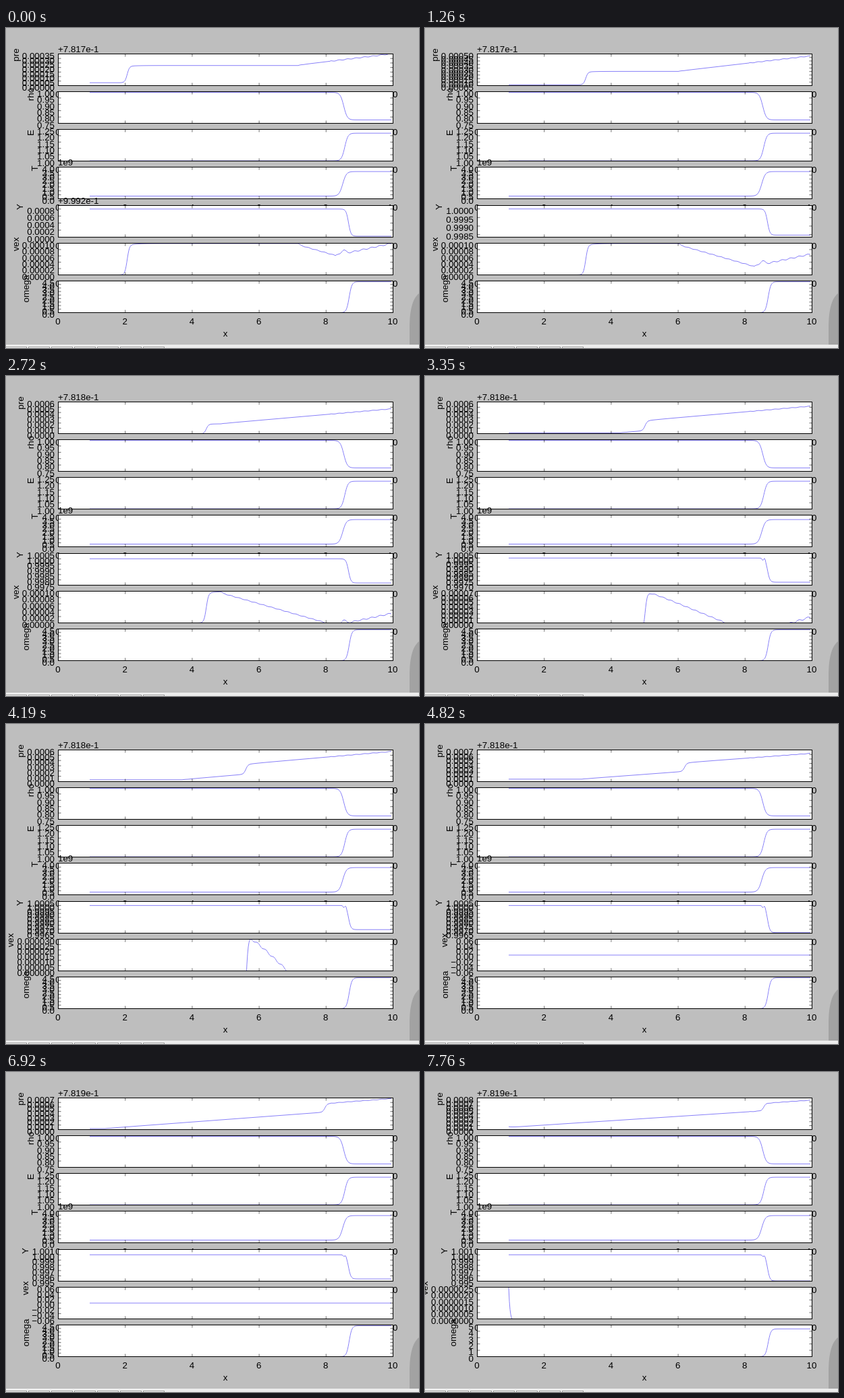
Write an HTML page with a canvas that moves like this. It is 612 by 475 pixels and loops after 8000 ms.

```html
<!DOCTYPE html>
<html>
<head>
<meta charset="utf-8">
<style>
html, body { margin: 0; width: 612px; height: 475px; overflow: hidden; background: #bebebe; }
canvas { display: block; }
</style>
</head>
<body>
<canvas id="stage" width="612" height="475"></canvas>
<script>
const ctx = document.getElementById('stage').getContext('2d');
const LOOP = 8000;
const STARTS = [0, 630, 1260, 1880, 2720, 3350, 4190, 4820, 5660, 6290, 6920, 7760];
const LEFT = 77.5, RIGHT = 573.5, HEIGHT = 47, UNIT = 49.6;
const FIRST = 124, LAST = 571;
const TOPS = [38.5, 94.5, 150.5, 206.5, 263.5, 319.5, 375.5];

const sig = (x, c, w) => 1 / (1 + Math.exp((c - x) / w));
const bell = (x, c, w) => Math.exp(-(((x - c) / w) ** 2));
const frontX = k => 179.5 + 29.3 * k;   // wave moving right
const backX = k => 433 - 28.6 * k;      // wave moving left

// Rise across the right-moving front, with a slow tail behind it
function front(x, k) {
  const c = frontX(k);
  return 0.95 * sig(x, c, 1.7) + (x > c ? 0.05 * (1 - Math.exp((c - x) / 12)) : 0);
}

function pressure(x, k) {
  const u = x - backX(k);
  const base = 3.2 + 1.4 * k + 0.05 * k * k;
  const ramp = Math.max(0, u - 8) * (k ? 0.111 : 0.09);
  const step = u > 0 ? 1.2 * (1 - Math.exp(-u / 4)) : 0;
  const ripple = x > 480 && u > 0 ? 0.4 * Math.sin(x * 0.5) : 0;
  const edge = k === 11 ? 2 * Math.exp((FIRST - x) / 5) : 0;
  return (base + 19 * front(x, k) + ramp + step + ripple + edge) * 1e-5;
}

function velocity(x, k) {
  if (k === 11) return 2.7e-6 * Math.exp((FIRST - x) / 1.9) - 0.2e-6;
  if (k > 6) return 0;
  const u = Math.min(x, 488) - backX(k);
  let v = 9.9 * front(x, k);
  if (u > 0) {
    const stairs = u - 1.5 * Math.sin(u * 0.52);
    v -= 0.061 * stairs + 0.4 * (1 - Math.exp(-u / 3));
  }
  if (x > 488) {
    v += 0.046 * (x - 488) + 1.2 * bell(x, 500, 4.5) + 0.18 * Math.sin((x - 488) * 0.5);
  }
  return Math.min(v, 9.9) * 1e-5;
}

function fraction(x, k) {
  const burnt = 0.00077 + 0.00038 * k;
  const kink = k > 4 ? 2e-4 * (bell(x, 503.5, 1.3) - bell(x, 500.5, 1.5)) : 0;
  return 1 - burnt * sig(x, 507.5, 1.8) + kink;
}

function pressureAxis(k) {
  const hi = [35, 45, 50, 60, 60, 60, 60, 70, 70, 80, 70, 80][k] * 1e-5;
  const shift = k < 4 ? 0 : k < 10 ? 1 : 2;
  return { lo: k === 2 ? 5e-5 : 0, hi, step: k < 3 ? 5e-5 : 1e-4, dp: k < 3 ? 5 : 4,
    minus: shift * 1e-4, note: '+7.8' + (17 + shift) + 'e-1' };
}

function fractionAxis(k) {
  if (k === 0) return { lo: 0, hi: 9e-4, step: 2e-4, dp: 4, minus: 0.9992, note: '+9.992e-1' };
  const lo = [0, 0.9988, 0.99835, 0.998, 0.9975, 0.997, 0.9965, 0.9965, 0.996][k] || 0.995;
  const hi = k < 3 ? 1.0002 : k < 9 ? 1.0005 : 1.001;
  return { lo, hi, step: k < 2 ? 2e-4 : k < 9 ? 5e-4 : 1e-3, dp: k < 9 ? 4 : 3 };
}

function velocityAxis(k) {
  if (k < 5) return { lo: 0, hi: 1e-4, step: 2e-5, dp: 5 };
  if (k === 5) return { lo: 0, hi: 7e-5, step: 1e-5, dp: 5 };
  if (k === 6) return { lo: 0, hi: 3e-5, step: 5e-6, dp: 6 };
  if (k < 11) return { lo: -0.06, hi: 0.06, step: 0.02, dp: 2 };
  return { lo: 0, hi: 2.5e-6, step: 5e-7, dp: 7 };
}

// dy: name centre below the panel top; gap: name centre left of the tick labels
const PANELS = [
  { name: 'pre', dy: 1.5, gap: 9, axis: pressureAxis, curve: pressure },
  { name: 'rho', dy: 4, gap: 9, axis: () => ({ lo: 0.75, hi: 1, step: 0.05, dp: 2 }),
    curve: x => 0.994 - 0.217 * sig(x, 500.5, 2.6) },
  { name: 'E', dy: 5, gap: 9, axis: () => ({ lo: 1, hi: 1.25, step: 0.05, dp: 2 }),
    curve: x => 1.002 + 0.218 * sig(x, 502, 2.4) },
  { name: 'T', dy: 2, gap: 10, axis: () => ({ lo: 0, hi: 4, step: 0.5, dp: 1, note: '1e9' }),
    curve: x => 0.34 + 3.1 * sig(x, 499, 2.7) },
  { name: 'Y', dy: 2, gap: 10, axis: fractionAxis, curve: fraction },
  { name: 'vex', dy: 1.5, gap: 9, axis: velocityAxis, curve: velocity },
  { name: 'omega', dy: 11.5, gap: 23,
    axis: k => k < 11 ? { lo: 0, hi: 4.5, step: 0.5, dp: 1 } : { lo: 0, hi: 5, step: 1, dp: 0 },
    curve: x => 4.38 * sig(x, 508.5, 2) }
];

function text(str, x, y, align) {
  ctx.textAlign = align;
  ctx.fillText(str, x, y);
}

function line(x1, y1, x2, y2) {
  ctx.beginPath();
  ctx.moveTo(x1, y1);
  ctx.lineTo(x2, y2);
  ctx.stroke();
}

function drawPanel(panel, top, k) {
  const axis = panel.axis(k), bottom = top + HEIGHT;
  const toY = v => bottom - (v - axis.lo) / (axis.hi - axis.lo) * HEIGHT;

  ctx.fillStyle = '#fff';
  ctx.fillRect(LEFT, top, RIGHT - LEFT, HEIGHT);

  ctx.save();
  ctx.beginPath();
  ctx.rect(LEFT, top, RIGHT - LEFT, HEIGHT);
  ctx.clip();
  ctx.beginPath();
  for (let x = FIRST; x <= LAST; x++) ctx.lineTo(x, toY(panel.curve(x, k) - (axis.minus || 0)));
  ctx.strokeStyle = '#8880f8';
  ctx.lineWidth = 1;
  ctx.stroke();
  ctx.restore();

  ctx.strokeStyle = ctx.fillStyle = '#000';
  ctx.lineWidth = 1;
  ctx.strokeRect(LEFT, top, RIGHT - LEFT, HEIGHT);
  ctx.lineWidth = 0.6;

  for (let n = 0; n <= 10; n += 2) {
    const x = LEFT + n * UNIT;
    line(x, top, x, top + 4);
    line(x, bottom, x, bottom - 4);
    text(n, x - 0.5, bottom + 17.3, 'center');
  }

  let widest = 0;
  const end = Math.floor(axis.hi / axis.step + 1e-6);
  for (let i = Math.ceil(axis.lo / axis.step - 1e-6); i <= end; i++) {
    const y = toY(i * axis.step);
    const label = (i * axis.step).toFixed(axis.dp).replace('-', '\u2212');
    line(LEFT, y, LEFT + 4, y);
    line(RIGHT, y, RIGHT - 4, y);
    text(label, 72, y + 7.3, 'right');
    widest = Math.max(widest, ctx.measureText(label).width);
  }
  if (axis.note) text(axis.note, LEFT - 0.5, top - 2.5, 'left');

  ctx.save();
  ctx.translate(72 - widest - panel.gap, top + panel.dy);
  ctx.rotate(-Math.PI / 2);
  text(panel.name, 0, 4, 'center');
  ctx.restore();
}

function drawDesktop() {
  ctx.fillStyle = '#bebebe';
  ctx.fillRect(0, 0, 612, 475);

  ctx.beginPath();
  ctx.moveTo(612, 394);
  ctx.bezierCurveTo(602, 402, 598, 420, 598, 445);
  ctx.lineTo(598, 471);
  ctx.lineTo(612, 471);
  ctx.fillStyle = '#a2a2a2';
  ctx.fill();

  ctx.fillStyle = '#ececec';
  ctx.fillRect(0, 470, 612, 5);
  ctx.strokeStyle = '#9a9a9a';
  ctx.fillStyle = '#fafafa';
  ctx.lineWidth = 1;
  for (let i = 0; i < 7; i++) {
    ctx.fillRect(34 * i - 0.5, 473.5, 31, 4);
    ctx.strokeRect(34 * i - 0.5, 473.5, 31, 4);
  }
}

function draw(k) {
  drawDesktop();
  ctx.font = '13.33px "Liberation Sans", Arial, sans-serif';
  PANELS.forEach((panel, i) => drawPanel(panel, TOPS[i], k));
  text('x', 325, 458, 'center');
}

const origin = performance.now();
function tick() {
  const t = Math.max(0, performance.now() - origin) % LOOP;
  draw(STARTS.filter(s => s <= t).length - 1);
  requestAnimationFrame(tick);
}
tick();
</script>
</body>
</html>
```
